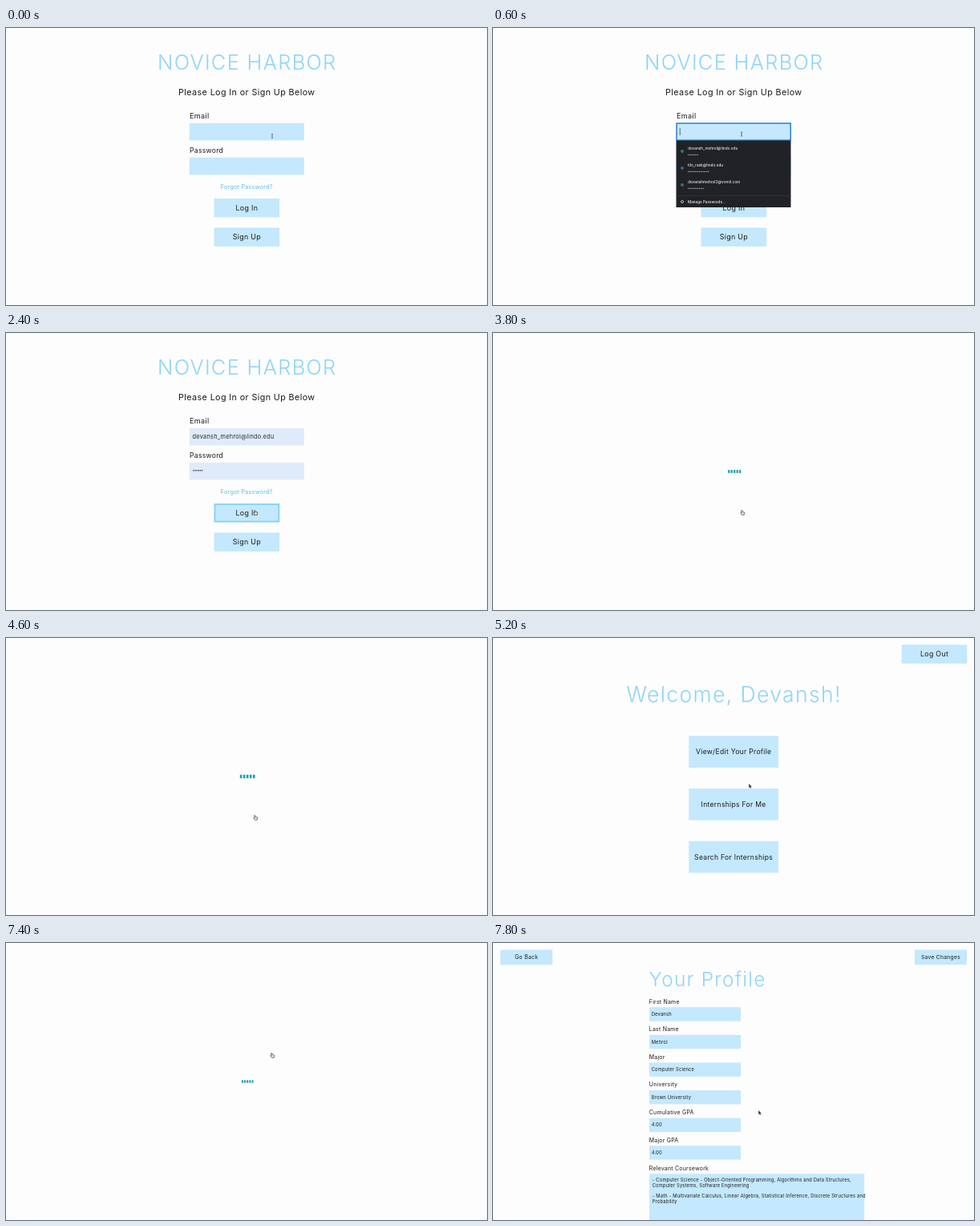
These frames come from a looping animation (600x346 px, 8 s). An HTML page with a canvas:

```html
<!DOCTYPE html>
<html lang="en">
<head>
<meta charset="utf-8">
<title>Novice Harbor</title>
<style>
  html, body { margin: 0; width: 100%; height: 100%; overflow: hidden; background: #fdfdfd; }
  canvas { display: block; width: 600px; height: 346px; }
</style>
</head>
<body>
<canvas id="stage"></canvas>
<script>
const W = 600, H = 346, LOOP = 8000, STEP = 200;
const canvas = document.getElementById('stage');
const g = canvas.getContext('2d');
const dpr = window.devicePixelRatio || 1;
canvas.width = W * dpr;
canvas.height = H * dpr;

const INK = '#1b1b1b', SKY = '#8fd4f8', PALE = '#c4e8fd', FILLED = '#dfebfa', LINE = '#8bd1f4';
const TITLE = { weight: 300, color: SKY, gap: 0.05 };

const USER = { first: 'Devansh', last: 'Mehrol', mail: 'devansh_mehrol@lindo.edu' };
const LOGINS = [[USER.mail, 6], ['tilo_rask@lindo.edu', 12], ['devanshmehrol3@vomil.com', 9]];
const PROFILE = [
  ['First Name', USER.first],
  ['Last Name', USER.last],
  ['Major', 'Computer Science'],
  ['University', 'Brown University'],
  ['Cumulative GPA', '4.00'],
  ['Major GPA', '4.00']
];
const COURSES = [
  [296, '- Computer Science - Object-Oriented Programming, Algorithms and Data Structures,'],
  [302.6, 'Computer Systems, Software Engineering'],
  [316.3, '- Math - Multivariate Calculus, Linear Algebra, Statistical Inference, Discrete Structures and'],
  [323, 'Probability']
];

// Pointer path: time, x, y, shape
const PATH = [
  [0, 332, 135, 'beam'], [400, 312, 132.5, 'beam'], [600, 310, 132.5, 'beam'],
  [800, 304, 143, 'arrow'], [1000, 297, 152, 'arrow'], [1200, 295, 154, 'arrow'],
  [1600, 295, 154, 'arrow'], [2200, 311.3, 224.5, 'hand'], [4800, 311.3, 224.5, 'hand'],
  [5000, 313, 215, 'hand'], [5200, 320, 185, 'arrow'], [5600, 331, 146, 'hand'],
  [5800, 332.3, 140.5, 'hand'], [7600, 332.3, 140.5, 'hand'], [7800, 332, 212, 'arrow']
];

function box(x, y, w, h, color) {
  g.fillStyle = color;
  g.fillRect(x, y, w, h);
}

function frame(x, y, w, h, color, line) {
  g.strokeStyle = color;
  g.lineWidth = line;
  g.strokeRect(x + line / 2, y + line / 2, w - line, h - line);
}

function dot(x, y, r, color) {
  g.fillStyle = color;
  g.beginPath();
  g.arc(x, y, r, 0, Math.PI * 2);
  g.fill();
}

// y is the middle of the capital letters, gap is letter spacing in em
function text(str, x, y, size, { weight = 400, gap = 0.034, align = 'left', color = INK } = {}) {
  g.font = `${weight} ${size}px Inter, "Open Sans", sans-serif`;
  g.letterSpacing = gap * size + 'px';
  g.textAlign = align;
  g.fillStyle = color;
  g.fillText(str, x, y + size * 0.36);
}

function button(label, x, y, w, h, size, focused) {
  box(x, y, w, h, PALE);
  if (focused) frame(x, y, w, h, LINE, 1.8);
  text(label, x + w / 2, y + h / 2, size, { align: 'center' });
}

function bullets(n, x, y, pitch, r, color) {
  for (let i = 0; i < n; i++) dot(x + i * pitch, y, r, color);
}

function dropdown(hover) {
  const style = { weight: 500, gap: 0, color: '#e6e7e9' };
  box(228.5, 140.5, 143, 83.5, '#202226');
  if (hover) box(228.5, 143, 143, 20.5, '#3a3c41');
  LOGINS.forEach(([mail, n], i) => {
    const y = 150.2 + i * 21;
    dot(236, y + 3.8, 2, i === 1 ? '#33698c' : '#2b7880');
    text(mail, 243, y, 4.7, style);
    bullets(n, 243.8, y + 8.2, 2.28, 0.65, '#d4d5d8');
  });
  box(228.5, 209.3, 143, 0.6, '#3a3c40');
  g.strokeStyle = '#b9babd';
  g.lineWidth = 1;
  g.beginPath();
  g.arc(236, 217, 1.5, 0, Math.PI * 2);
  g.stroke();
  text('Manage Passwords...', 243, 217, 4.6, style);
}

function loginPage(t) {
  const filled = t >= 1400, editing = t >= 400 && t < 2200;
  text('NOVICE HARBOR', 300.8, 42.8, 25.5, { ...TITLE, align: 'center' });
  text('Please Log In or Sign Up Below', 300.3, 80, 10.8, { align: 'center' });
  text('Email', 229, 110, 9.1);
  text('Password', 229, 153, 8.6);
  for (const y of [118.8, 161.8]) box(228.8, y, 143, 21.6, filled ? FILLED : PALE);
  if (filled) {
    text(USER.mail, 232.6, 129.6, 7.35, { color: '#2a2c30' });
    bullets(6, 233.8, 171.8, 2.15, 0.75, '#222');
  }
  text('Forgot Password?', 300.2, 198.5, 7.2, { align: 'center', color: '#5dbcec' });
  button('Log In', 259.6, 213, 81.6, 23.4, 8.9, t >= 2200);
  button('Sign Up', 259.6, 249.4, 81.6, 23.4, 8.9);
  if (editing) {
    frame(228.3, 118.3, 143.7, 22.6, '#2f7fd3', 1.5);
    if (!filled) box(232.8, 125, 0.8, 9, '#3c4a55');
  }
  if (editing && t >= 600 && !filled) dropdown(t >= 1000);
}

function loader(t) {
  const s = 0.89 + 0.11 * Math.cos((t - 4600) / 1120 * Math.PI * 2);
  for (let i = -2; i <= 2; i++) {
    box(301.2 + (i * 4.05 - 1.3) * s, 173 - 2.2 * s, 2.6 * s, 4.4 * s, '#1b9fb6');
  }
}

function welcomePage(t) {
  const chosen = t >= 5800;
  button('Log Out', 509.8, 8.4, 81.5, 23.4, 8.8);
  text(`Welcome, ${USER.first}!`, 300.6, 70, 26.6, { ...TITLE, align: 'center' });
  button('', 244.2, 122.3, 111.8, 39.6, 8.6, chosen);
  if (chosen) box(253, 137, 80.5, 10.8, '#8fc9f3');
  text('View/Edit Your Profile', 300.2, 142.3, 8.6, { align: 'center' });
  button('Internships For Me', 244.2, 188, 111.8, 39.6, 8.6);
  button('Search For Internships', 244.2, 253.7, 111.8, 39.6, 8.6);
}

function profilePage() {
  button('Go Back', 9.2, 8.5, 65, 18.6, 6.9);
  button('Save Changes', 526, 8.5, 65, 18.6, 6.8);
  text('Your Profile', 194.5, 45.3, 24.5, TITLE);
  PROFILE.forEach(([label, value], i) => {
    const y = 80.2 + i * 34.6;
    text(label, 194.8, y - 7.2, 6.95);
    box(195, y, 114, 17.4, PALE);
    text(value, 197.7, y + 8.8, 5.75);
  });
  text('Relevant Coursework', 194.8, 281, 6.95);
  box(195, 288.3, 268.2, 57.7, PALE);
  for (const [y, line] of COURSES) text(line, 198.7, y, 5.75);
}

function shape(points, fill, stroke) {
  g.beginPath();
  points.forEach(([x, y]) => g.lineTo(x, y));
  g.closePath();
  g.fillStyle = fill;
  g.fill();
  g.strokeStyle = stroke;
  g.lineWidth = 0.7;
  g.stroke();
}

const POINTERS = {
  beam() {
    box(-0.4, -2.5, 0.8, 5, '#444');
    box(-1.2, -2.8, 2.4, 0.6, '#666');
    box(-1.2, 2.2, 2.4, 0.6, '#666');
  },
  arrow() {
    shape([[-0.6, -2.6], [-0.6, 1.9], [0.5, 1], [1.2, 2.6], [1.9, 2.2], [1.2, 0.8], [2.5, 0.7]], '#111', '#777');
  },
  hand() {
    shape([[-1.6, -2.8], [-0.5, -2.8], [0, -1.1], [2.2, -0.6], [2.6, 0.6], [1.9, 2.7], [-0.8, 2.7], [-2.5, 0.4], [-2.1, -0.3], [-1.1, 0.1]], '#e4e4e4', '#444');
  }
};

function pointer(t) {
  let i = 0;
  while (i < PATH.length - 1 && PATH[i + 1][0] <= t) i++;
  const a = PATH[i], b = PATH[i + 1] || a;
  const k = b === a ? 0 : (t - a[0]) / (b[0] - a[0]);
  g.save();
  g.translate(a[1] + (b[1] - a[1]) * k, a[2] + (b[2] - a[2]) * k);
  POINTERS[a[3]]();
  g.restore();
}

function draw(now) {
  const t = Math.floor((now % LOOP) / STEP) * STEP;
  g.setTransform(dpr, 0, 0, dpr, 0, 0);
  box(0, 0, W, H, '#fdfdfd');
  if (t < 3800) loginPage(t);
  else if (t < 4800) loader(t);
  else if (t < 6600) welcomePage(t);
  else if (t < 7600) loader(t);
  else profilePage();
  pointer(t);
}

const start = performance.now();
function tick() {
  draw(performance.now() - start);
  requestAnimationFrame(tick);
}
tick();
</script>
</body>
</html>
```
